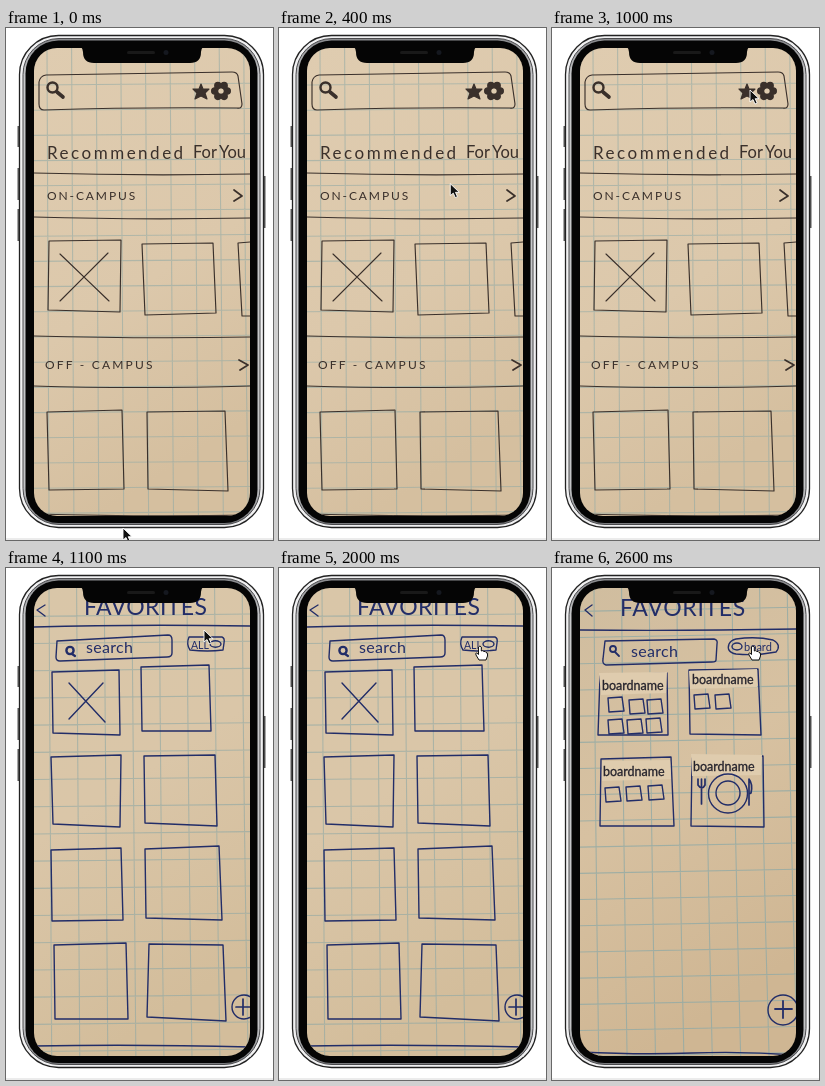
These frames come from a looping animation (267 by 512 pixels, 3200 ms). An HTML page:

```html
<!DOCTYPE html>
<html lang="en">
<head>
<meta charset="utf-8">
<title>Paper prototype</title>
<style>
  html, body { margin: 0; width: 100%; height: 100%; overflow: hidden; background: #fff; }
  svg { display: block; width: 100vw; height: 100vh; }
  text { font-family: Lato, "Open Sans", sans-serif; white-space: pre; }
  .ink path, .ink circle, .ink ellipse { fill: none; stroke: currentColor; stroke-linecap: round; stroke-linejoin: round; }
  .ink text { fill: currentColor; }
  .ink .solid { fill: currentColor; }
  .ink .label { fill: #dfccae; stroke: none; }
  .ink .thick { stroke-width: 2.4; }
  .ink .grid { stroke: #93aaa5; stroke-width: 1.1; }
  .names { color: #25232c; font-size: 12.5px; stroke: currentColor; stroke-width: .3; }
  #home { color: #3a302b; stroke-width: 1.15; }
  #favorites, #boards { color: #222d68; stroke-width: 1.4; }
</style>
</head>
<body>
<svg viewBox="0 0 267 512">
  <defs>
    <clipPath id="screen"><rect x="28" y="20" width="216" height="468" rx="23"/></clipPath>
    <linearGradient id="homePaper" x2=".3" y2="1">
      <stop stop-color="#dfccb0"/><stop offset=".6" stop-color="#dcc8ab"/><stop offset="1" stop-color="#d5bf9f"/>
    </linearGradient>
    <linearGradient id="favoritesPaper" x2=".3" y2="1">
      <stop stop-color="#d9c6a8"/><stop offset=".5" stop-color="#dac6a8"/><stop offset="1" stop-color="#d3bd9b"/>
    </linearGradient>
    <linearGradient id="boardsPaper" x2=".3" y2="1">
      <stop stop-color="#d0bd9f"/><stop offset=".5" stop-color="#d7c1a1"/><stop offset="1" stop-color="#cfb693"/>
    </linearGradient>
    <linearGradient id="steel" x2="0" y2="1">
      <stop stop-color="#88898c"/><stop offset=".08" stop-color="#c9cacc"/>
      <stop offset=".92" stop-color="#c4c5c7"/><stop offset="1" stop-color="#77787b"/>
    </linearGradient>
  </defs>

  <path d="M0 511H267" stroke="#d8d8d8"/>

  <!-- phone body -->
  <path d="M12.500 98v21M12.500 140v32M12.500 181v32M258.500 148v52" stroke="#555" stroke-width="2"/>
  <rect x="13.500" y="7.500" width="244" height="492" rx="39" fill="#f1f1f2" stroke="#222" stroke-width="1.300"/>
  <rect x="17" y="10.500" width="237" height="486" rx="36" fill="url(#steel)" stroke="#4a4a4d"/>
  <rect x="19.500" y="12.500" width="232" height="482.500" rx="33" fill="#050505"/>

  <g clip-path="url(#screen)">
    <g id="home" class="ink">
      <rect x="28" y="20" width="216" height="468" fill="url(#homePaper)"/>
      <path class="grid" data-grid="41 56 24.6 25.2 3" opacity=".6"/>
      <path d="M33 54Q34 48 40 47L226 44Q231 44 232 48L236 76Q236 81 231 80Q130 79 38 82Q33 82 33 76Z"/>
      <circle class="thick" cx="46.500" cy="59.500" r="5"/>
      <path d="M51 64l6 5" stroke-width="3.600"/>
      <path class="solid" d="M195 56l2 5 6 0-4 4 2 6-6-3-6 3 2-6-4-4 6 0Z"/>
      <g id="flower"></g>
      <text x="41" y="131" font-size="17" letter-spacing="2.500">Recommended</text>
      <text x="187" y="130" font-size="16.500">For</text>
      <text x="213" y="130" font-size="16.500">You</text>
      <path d="M28 145Q135 148 244 146M28 189Q130 192 244 190M28 308Q140 311 244 309M28 358Q130 361 244 358M28 486Q140 489 244 487"/>
      <text x="41" y="172" font-size="12" letter-spacing="1.900">ON-CAMPUS</text>
      <text x="39" y="341" font-size="12" letter-spacing="2.200">OFF - CAMPUS</text>
      <path d="M228 162l8 6-8 5M233 332l9 5-8 5" stroke-width="1.700"/>
      <path d="M43 213L115 212 114 284 42 282ZM54 226L103 273M102 225L54 273"/>
      <path d="M136 216L207 215 210 285 139 287ZM244 214L232 215 236 288 244 288"/>
      <path d="M41 384L116 382 118 461 43 462ZM141 384L219 383 222 463 142 461Z"/>
    </g>

    <g id="favorites" class="ink">
      <rect x="28" y="20" width="216" height="468" fill="url(#favoritesPaper)"/>
      <path class="grid" data-grid="43 47 27.6 27.2 4" opacity=".65"/>
      <path d="M28 59Q130 56 244 58M39 37L31 42 39 48M28 478Q130 476 244 479"/>
      <text x="78" y="47" font-size="23" letter-spacing=".4">FAVORITES</text>
      <path d="M51 73L162 67Q166 67 166 72V85Q166 89 161 89L54 93Q50 93 50 89Z"/>
      <circle class="thick" cx="64" cy="82.500" r="3.600"/>
      <path d="M66 86l3 2" stroke-width="2.200"/>
      <text x="80" y="85" font-size="16" letter-spacing=".3">search</text>
      <path d="M183 69L216 69Q219 70 218 75L217 82Q202 84 184 82Q180 76 183 69Z"/>
      <text x="185" y="81" font-size="10.500">ALL</text>
      <ellipse cx="209.500" cy="76" rx="5.500" ry="3.200"/>
      <path d="M46 104L113 102 114 167 47 165ZM63 115L99 154M97 115L63 151"/>
      <path d="M135 99L203 97 205 163 136 163ZM45 189L115 187 114 259 47 256Z"/>
      <path d="M138 188L209 187 211 258 139 255ZM45 282L115 280 117 352 46 353Z"/>
      <path d="M139 281L213 278 216 352 140 350ZM48 377L120 375 122 451 49 451Z"/>
      <path d="M143 376L217 377 220 453 141 449Z"/>
      <circle cx="238" cy="439" r="12"/>
      <path d="M237 431v16M230 439h14" stroke-width="1.700"/>
    </g>

    <g id="boards" class="ink">
      <rect x="28" y="20" width="216" height="468" fill="url(#boardsPaper)"/>
      <path class="grid" data-grid="42 41 27.6 26.2 7" opacity=".8"/>
      <path d="M28 62Q130 63 244 61M40 37L33 42 40 48M28 484Q90 487 140 485T244 487"/>
      <text x="68" y="48" font-size="23" letter-spacing=".7">FAVORITES</text>
      <path d="M53 73L162 71Q166 72 165 76L164 92Q164 94 160 94L54 97Q50 96 51 91Z"/>
      <circle cx="61" cy="81" r="3" stroke-width="1.800"/>
      <path d="M63 84l4 4" stroke-width="1.800"/>
      <text x="79" y="89" font-size="16" letter-spacing=".3">search</text>
      <path d="M184 71Q204 68 221 72Q230 77 224 84Q204 88 184 86Q174 84 177 76Q179 72 184 71Z"/>
      <ellipse cx="185" cy="78.500" rx="5" ry="3.500"/>
      <text x="192" y="82.500" font-size="11">board</text>

      <path d="M48 108L115 105 116 167 46 167ZM137 102L206 101 209 167 138 166Z"/>
      <path d="M49 191L119 189 122 258 48 258ZM140 190L211 188 212 259 139 258Z"/>
      <path class="label" d="M47 105L115 104 114 125 49 127ZM137 103L205 101 205 119 138 121ZM50 193L118 192 119 211 50 213ZM139 186L210 187 209 207 140 208Z"/>
      <g class="names">
        <text x="50" y="122">boardname</text>
        <text x="140" y="116">boardname</text>
        <text x="51" y="208">boardname</text>
        <text x="141" y="203">boardname</text>
      </g>
      <path id="tiles"/>
      <circle cx="176" cy="225.500" r="19.500"/>
      <circle cx="176" cy="225" r="12"/>
      <path d="M146 211v6q4 6 7 0v-6M149.500 211v25M197 237V211q4 5 2 14l-2 1" stroke-width="1.700"/>
      <circle cx="231" cy="442" r="15"/>
      <path d="M231 433v17M223 441h17" stroke-width="1.800"/>
    </g>
  </g>

  <path d="M75 19H197Q195 21 195 24Q195 35 184 35H88Q77 35 77 24Q77 21 75 19Z" fill="#050505"/>
  <rect x="121" y="23" width="28" height="3" rx="1.500" fill="#191919"/>
  <circle cx="160" cy="24.500" r="2.500" fill="#15181f"/>

  <g id="cursor" stroke-linejoin="round">
    <path id="arrow" d="M0 0V12L3 9.500 5 14 7.200 13 5.200 8.700H9Z" fill="#111" stroke="#fff" stroke-width=".9"/>
    <path id="hand" d="M-1.500 1Q0 -1 1.300 1V5Q3 4 3.800 5.500Q5.300 5 6 6.500Q7.500 6.500 7.500 8V10L6 14H-1L-4 9Q-5 7 -3.200 7L-1.500 8.500Z" fill="#fff" stroke="#111"/>
  </g>
</svg>
<script>
  const LOOP = 3200, STEP = 100;
  const byId = id => document.getElementById(id);

  // Squared paper: start x, start y, column gap, row gap, drift of the lines
  for (const grid of document.querySelectorAll('.grid')) {
    const [x0, y0, dx, dy, drift] = grid.dataset.grid.split(' ').map(Number);
    let d = '';
    for (let x = x0; x < 244; x += dx) {
      const lean = drift * (.5 + x / 244);
      d += `M${x} 20Q${x + lean / 4} 250 ${x + lean} 488`;
    }
    for (let y = y0; y < 488; y += dy) d += `M28 ${y + drift / 3}Q136 ${y} 244 ${y - drift / 4}`;
    grid.setAttribute('d', d);
  }

  const tiles = [[56, 129], [77, 131], [95, 131], [56, 151], [75, 151], [94, 150],
    [142, 126], [163, 126], [53, 219], [74, 218], [96, 217]];
  byId('tiles').setAttribute('d', tiles.map(([x, y]) => `M${x} ${y + 1}l14-1 2 14-15 1Z`).join(''));

  let petals = '';
  for (let i = 0; i < 6; i++) {
    const a = i * Math.PI / 3;
    petals += `<circle class="solid" cx="${215 + 6.2 * Math.cos(a)}" cy="${63 + 6.2 * Math.sin(a)}" r="3.2"/>`;
  }
  byId('flower').innerHTML = petals +
    '<circle cx="215" cy="63" r="4.5" stroke-width="4"/><circle cx="215" cy="63" r="2.6" style="fill:#dfccb0;stroke:none"/>';

  const show = (id, on) => byId(id).style.display = on ? '' : 'none';
  const ease = (t, from, to) => {
    const u = Math.min(1, Math.max(0, (t - from) / (to - from)));
    return u * u * (3 - 2 * u);
  };

  function draw(now) {
    const t = Math.floor(now % LOOP / STEP) * STEP;
    show('home', t < 1100);
    show('favorites', t >= 1100 && t < 2100);
    show('boards', t >= 2100);

    // Sweep up to the star, then settle on the filter button
    const settle = ease(t, 1100, 1700);
    const x = 117 + 81 * ease(t, 0, 650) + 3 * settle;
    const y = 500 - 438 * ease(t, 0, 570) + 16 * settle;
    byId('cursor').setAttribute('transform', `translate(${x} ${y})`);
    show('arrow', settle < .4);
    show('hand', settle >= .4);
    requestAnimationFrame(draw);
  }
  draw(performance.now());
</script>
</body>
</html>
```
